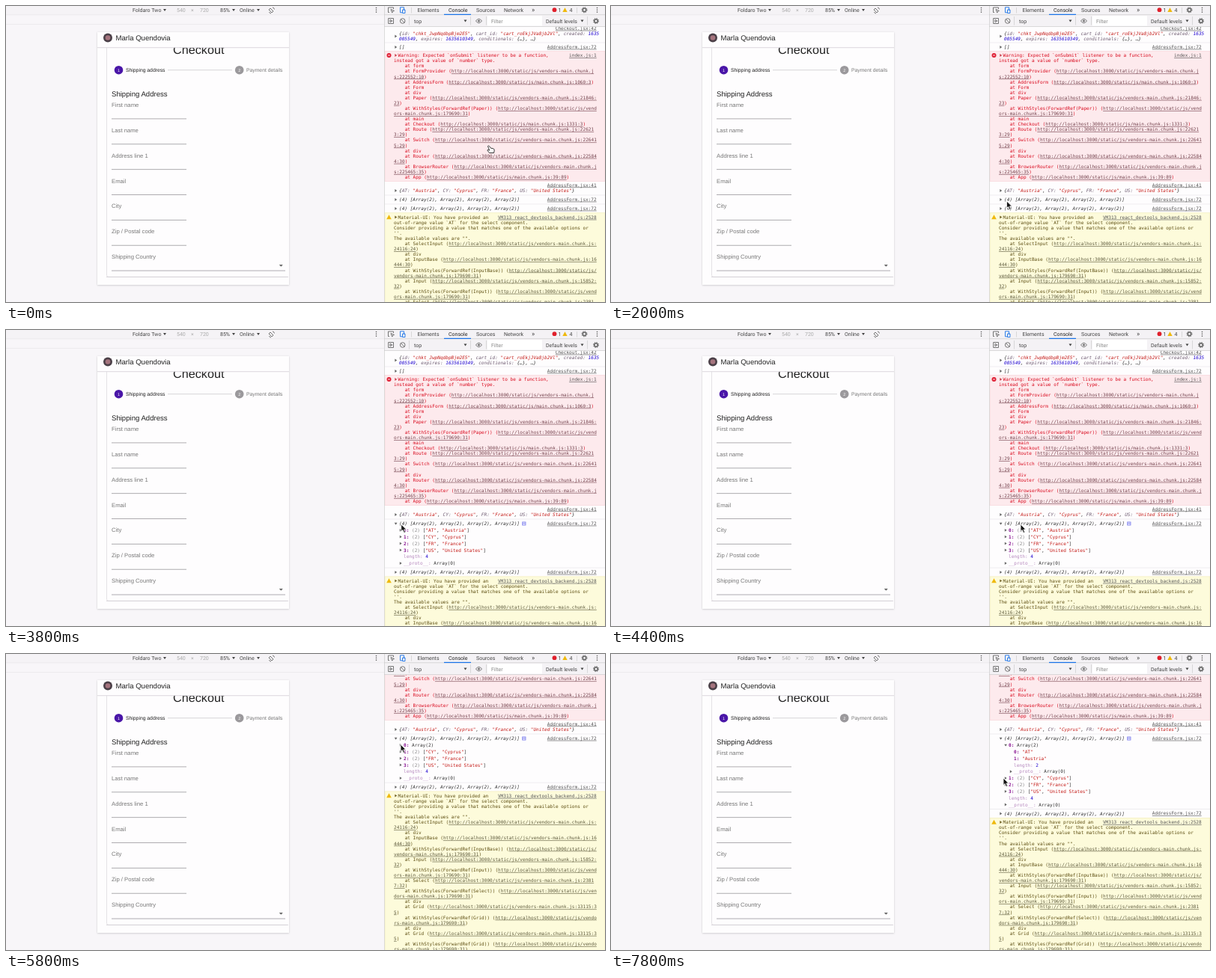
Recreate the animation shown at these times as an HTML page. Size 800 by 396 pixels, loop 8000 ms.

```html
<!DOCTYPE html>
<html lang="en">
<head>
<meta charset="utf-8">
<title>Checkout with console</title>
<style>
  html, body { margin: 0; width: 100%; height: 100%; overflow: hidden; background: #f8f6f9; }
  svg { display: block; width: 100%; height: 100%; }
  text { white-space: pre; text-rendering: geometricPrecision; }
  .ui { font: 7px Roboto, sans-serif; fill: #444; }
  .page { font-family: "Liberation Sans", Arial, sans-serif; fill: #222; }
  .label { font-size: 7.7px; fill: #777; }
  .log { font: 6.08px "DejaVu Sans Mono", monospace; fill: #303030; }
  .italic { font-style: italic; }
  .error { fill: #d90a1e; }
  .warn { fill: #5c4d10; }
  .link { fill: #555; text-decoration: underline; }
  .error .link { fill: #74434e; }
  .warn .link { fill: #5d5a3c; }
  .string { fill: #c41a16; }
  .key { fill: #6d5a70; }
  .index { fill: #881391; font-weight: bold; }
  .faded { fill: #b587bd; }
  .number { fill: #1c00cf; }
  .count { fill: #888; }
  .rule { stroke: #e9e6ea; stroke-width: .7; }
  .sep { stroke: #ccc; stroke-width: .7; }
  .icon { fill: none; stroke: #666; stroke-width: .9; }
</style>
</head>
<body>
<svg viewBox="0 0 800 396" preserveAspectRatio="none">
  <defs>
    <clipPath id="logClip"><rect x="505" y="27.5" width="295" height="369"/></clipPath>
    <clipPath id="pageClip"><rect x="122" y="55.5" width="256" height="318"/></clipPath>
    <filter id="shadow" x="-5%" y="-5%" width="110%" height="110%">
      <feDropShadow dx="0" dy=".6" stdDeviation="1.2" flood-opacity=".2"/>
    </filter>
  </defs>

  <rect width="505" height="396" fill="#f8f6f9"/>
  <rect width="505" height="11.5" fill="#f5f3f6"/>
  <path class="rule" d="M0 11.8H505M0 24.5H505"/>
  <g class="ui">
    <text x="169" y="7.8">Foldaro Two</text>
    <text x="228" y="7.8" fill="#aaa" style="fill:#aaa">540</text>
    <text x="247" y="7.8" style="fill:#aaa">×</text>
    <text x="259" y="7.8" style="fill:#aaa">720</text>
    <text x="286" y="7.8">85%</text>
    <text x="312" y="7.8">Online</text>
    <path d="M210 4h4l-2 3zM302 4h4l-2 3zM335 4h4l-2 3z"/>
  </g>
  <path class="icon" d="M353 3l4 4-2 2-4-4zM356 2q2 0 2.500 2.500M354 10q-2-.2-2.500-2"/>
  <g fill="#555"><circle cx="494.500" cy="2.500" r=".8"/><circle cx="494.500" cy="5.300" r=".8"/><circle cx="494.500" cy="8.100" r=".8"/></g>

  <g class="page" id="page">
    <rect x="122" y="35" width="256" height="338" fill="#fefdfe" filter="url(#shadow)"/>
    <g clip-path="url(#pageClip)">
      <path d="M134.500 55V360q0 2.500 2.500 2.500H375.500" fill="none" stroke="#dedbdf" stroke-width=".8"/>
      <path d="M134 362.500H377" stroke="#d0ccd2" stroke-width=".8"/>
      <text x="223" y="64.300" font-size="16.2">Checkout</text>
    </g>
    <path d="M122 55.700H378" stroke="#dcd8de" stroke-width="1"/>
    <circle cx="136" cy="42.500" r="6" fill="#4b4048"/>
    <circle cx="136" cy="42.500" r="3.300" fill="#a5747e"/>
    <text x="146.500" y="45.800" font-size="9.6">Marla Quendovia</text>
    <path d="M216 85.700H302" stroke="#c8c5ca" stroke-width=".7"/>
    <circle cx="150.500" cy="85.700" r="5.800" fill="#4a16a8"/>
    <circle cx="311.700" cy="85.700" r="5.800" fill="#9b999c"/>
    <g font-size="5.4" text-anchor="middle" style="fill:#fff">
      <text x="150.500" y="87.600">1</text><text x="311.700" y="87.600">2</text>
    </g>
    <text x="160" y="88" font-size="6.8">Shipping address</text>
    <text x="321" y="88" font-size="6.8" style="fill:#777">Payment details</text>
    <text x="141" y="120.600" font-size="9.6">Shipping Address</text>
    <path d="M364.800 346h5l-2.500 2.700z" fill="#666"/>
  </g>

  <rect x="505" width="295" height="396" fill="#fefdfe"/>
  <g clip-path="url(#logClip)">
    <g id="scroll">
      <g id="above"></g>
      <g id="tree"></g>
      <g id="below"></g>
    </g>
  </g>

  <rect x="505" width="295" height="27.5" fill="#f4f2f5"/>
  <rect x="643" y="13" width="73" height="13.500" fill="#fff"/>
  <path class="sep" d="M505.500 0V396M505 11.700H800M505 27.500H800M541.500 2V9.500M762.500 2V9.500M538.500 14V25.500M620.500 14V25.500M641.500 14V25.500M776.500 14V25.500"/>
  <path d="M585 11.300H621" stroke="#1a73e8" stroke-width="1.200"/>
  <g class="ui">
    <text x="549.500" y="7.600">Elements</text>
    <text x="591" y="7.600" style="fill:#222">Console</text>
    <text x="628" y="7.600">Sources</text>
    <text x="665" y="7.600">Network</text>
    <text x="702" y="7.800" font-size="9">»</text>
    <text x="737.500" y="7.600">1</text><text x="752.500" y="7.600">4</text>
    <text x="545" y="22.500">top</text>
    <text x="648" y="22.500" style="fill:#888">Filter</text>
    <text x="721" y="22.500">Default levels</text>
    <path d="M611.500 18.500h4l-2 3zM767.500 18.500h4l-2 3z"/>
  </g>
  <circle cx="732.500" cy="5.200" r="2.900" fill="#e0202c"/>
  <path d="M746.500 2.200l3.200 5.800h-6.400z" fill="#efb90c"/>
  <g class="icon">
    <path d="M512 8.500h-1.500v-6.500h7v2M514 4.500l4.500 2-2 .6-.7 2z"/>
    <path d="M526.500 1.800h5v4M526.500 1.800v7h2.500M529.500 5h3.500v4.500h-3.500z" stroke="#1a73e8"/>
    <path d="M510.700 16.500h6.800v7h-6.800zM513 18.300l3 1.700-3 1.700z"/>
    <circle cx="529.700" cy="20" r="3.300"/><path d="M527.400 17.700l4.600 4.600"/>
    <path d="M627.500 20q4-5.500 8 0q-4 5.500-8 0z"/><circle cx="631.500" cy="20" r="1" fill="#666"/>
    <circle cx="772.500" cy="5.300" r="2.300" stroke-width="1.600"/><circle cx="772.500" cy="5.300" r="3.600" stroke-dasharray="1.400 1.430"/>
    <circle cx="788" cy="20" r="2.300" stroke-width="1.600"/><circle cx="788" cy="20" r="3.600" stroke-dasharray="1.400 1.430"/>
  </g>
  <g fill="#555"><circle cx="789.500" cy="2.500" r=".8"/><circle cx="789.500" cy="5.300" r=".8"/><circle cx="789.500" cy="8.100" r=".8"/></g>

  <g id="cursor">
    <path id="arrow" d="M0 0V9.500L2.200 7.500L3.900 11.400L5.700 10.600L4 6.900H7z" fill="#151515" stroke="#fff" stroke-width=".8"/>
    <path id="hand" d="M-3.500-3.500q1-1.200 2 0L.5-.8L3.500-.3Q5.300.1 5.200 2L4.600 5.500H-1.500L-4 2.200q-.2-1.200 1.300-.7L-1.300 2.200z" fill="#fff" stroke="#222" stroke-width=".9"/>
  </g>
</svg>

<script>
const $ = id => document.getElementById(id);
const NS = "http://www.w3.org/2000/svg";
const LINE = 7.08, ROW = 8.85, COLUMNS = 74;

function add(parent, tag, attrs, content) {
  const node = document.createElementNS(NS, tag);
  for (const name in attrs) node.setAttribute(name, attrs[name]);
  if (content !== undefined) node.textContent = content;
  parent.append(node);
  return node;
}

// Each part is [text, class]; y is the vertical middle of the line.
function write(parent, x, y, parts, cls = "") {
  const text = add(parent, "text", { x, y: y + 2.2, class: "log " + cls });
  for (const [content, part] of parts) add(text, "tspan", { class: part || "" }, content);
  return text;
}

function paint(source) {
  const token = /"[^"]*"|\w+:(?= )|\(\d\)(?= )|(?<=: )\d+|^\d+/g;
  const parts = [];
  let last = 0;
  for (const m of source.matchAll(token)) {
    const s = m[0];
    const cls = s[0] === '"' ? "string"
      : /^\d:$/.test(s) ? "index"
      : /^(length|__proto__):$/.test(s) ? "faded"
      : s.endsWith(":") ? "key"
      : s[0] === "(" ? (m.index ? "count" : "") : "number";
    parts.push([source.slice(last, m.index)], [s, cls]);
    last = m.index + s.length;
  }
  return [...parts, [source.slice(last)]];
}

function triangle(parent, x, y, open, fill = "#666") {
  return add(parent, "path", { fill, d: open
    ? `M${x - 1.8} ${y - 1.2}h3.800l-1.900 2.900z`
    : `M${x - 1.2} ${y - 1.9}v3.800l2.900-1.900z` });
}

function origin(parent, y, name) {
  add(parent, "text", { x: 788.7, y: y + 2.2, class: "log link", "text-anchor": "end" }, name);
}

const rule = (parent, y) => add(parent, "path", { class: "rule", d: `M506 ${y}H800` });

// Long lines break anywhere except before closing punctuation.
function stack(parent, y, calls, cls) {
  for (const call of calls) {
    const [name, place] = call.split(" ");
    let line = "    at " + name;
    if (place) {
      const file = place.includes("/") ? place.slice(1) : "vendors-main.chunk.js:" + place;
      line += ` (http://localhost:3000/static/js/${file})`;
    }
    const from = line.indexOf("http"), to = line.length - 1;
    for (let start = 0; start < line.length;) {
      let end = Math.min(start + COLUMNS, line.length);
      while (end < line.length && /[:\/.)]/.test(line[end])) end--;
      const cut = i => Math.min(Math.max(i, start), end);
      const parts = from < 0 ? [[line.slice(start, end)]] : [
        [line.slice(start, cut(from))],
        [line.slice(cut(from), cut(to)), "link"],
        [line.slice(cut(to), end)]];
      write(parent, 518, y, parts, cls);
      y += LINE;
      start = end;
    }
  }
}

const labels = ["First name", "Last name", "Address line 1", "Email", "City", "Zip / Postal code", "Shipping Country"];
labels.forEach((label, i) => {
  const y = 132.2 + i * 33.87;
  add($("page"), "text", { x: 141, y: y + 2.8, class: "label" }, label);
  add($("page"), "path", { d: `M141 ${y + 18.700}H${i < 6 ? 241 : 373}`, stroke: "#9a979c", "stroke-width": .8 });
});

const above = $("above"), tree = $("tree"), below = $("below");

origin(above, 29.5, "Checkout.jsx:42");
triangle(above, 520.5, 40.5);
write(above, 525, 37, paint('{id: "chkt_JwpNqdbpBjm2E5", cart_id: "cart_roEkjJVa8jb2Vl", created: 1635'), "italic");
write(above, 525, 44, paint("005549, expires: 1635610349, conditionals: {…}, …}"), "italic");
rule(above, 49);
triangle(above, 520.5, 55);
write(above, 525, 55, [["[]"]], "italic");
origin(above, 54.5, "AddressForm.jsx:72");

add(above, "rect", { x: 506, y: 60.5, width: 294, height: 174, fill: "#fdeaed", stroke: "#f8d6da", "stroke-width": .7 });
add(above, "circle", { cx: 511.5, cy: 66, r: 3, fill: "#df1f35" });
add(above, "path", { d: "M510.400 64.900l2.200 2.200m0-2.200l-2.200 2.200", stroke: "#fff", "stroke-width": .7 });
triangle(above, 520.5, 66, false, "#c8404e");
write(above, 523.5, 66, [["Warning: Expected `onSubmit` listener to be a function,"]], "error");
write(above, 518, 66 + LINE, [["instead got a value of `number` type."]], "error");
origin(above, 66, "index.js:1");
stack(above, 66 + 2 * LINE, [
  "form", "FormProvider 222552:10", "AddressForm /main.chunk.js:1060:3", "Form", "div",
  "Paper 21846:23", "WithStyles(ForwardRef(Paper)) 179690:31", "main", "Checkout /main.chunk.js:1331:3",
  "Route 226213:29", "Switch 226415:29", "div", "Router 225844:30", "BrowserRouter 225465:35",
  "App /main.chunk.js:39:89"
], "error");

origin(above, 239.3, "AddressForm.jsx:41");
triangle(above, 520.5, 247);
write(above, 525, 247, paint('{AT: "Austria", CY: "Cyprus", FR: "France", US: "United States"}'), "italic");
rule(above, 253);
const selection = add(above, "rect", { x: 525, y: 255.3, width: 161, height: 7.6, fill: "#b5b9e2" });
const summary = "(4) [Array(2), Array(2), Array(2), Array(2)]";
const closedMark = triangle(above, 520.5, 259), openMark = triangle(above, 520.5, 259, true);
write(above, 525, 259, paint(summary), "italic");
origin(above, 258.5, "AddressForm.jsx:72");

const info = add(tree, "g", {});
add(info, "rect", { x: 689, y: 256.2, width: 5.6, height: 5.6, rx: 1, fill: "#a9aaf3" });
add(info, "path", { d: "M691.800 257.200v.9m0 .7v2.200", stroke: "#fff", "stroke-width": .9 });

function property(parent, x, y, source, expandable = true) {
  if (expandable) triangle(parent, x - 4, y);
  return write(parent, x, y, paint(source));
}
const firstY = 259 + ROW;
const first = add(tree, "g", {}), firstPending = add(tree, "g", {}), nested = add(tree, "g", {}), rest = add(tree, "g", {});
property(first, 531, firstY, '0: (2) ["AT", "Austria"]');
property(firstPending, 531, firstY, "0: Array(2)");
triangle(nested, 527, firstY, true);
property(nested, 531, firstY, "0: Array(2)", false);
['0: "AT"', '1: "Austria"', "length: 2", "__proto__: Array(0)"].forEach((source, i) =>
  property(nested, 538, firstY + (i + 1) * ROW, source, i === 3));
['1: (2) ["CY", "Cyprus"]', '2: (2) ["FR", "France"]', '3: (2) ["US", "United States"]', "length: 4", "__proto__: Array(0)"]
  .forEach((source, i) => property(rest, 531, firstY + (i + 1) * ROW, source, i !== 3));

rule(below, 265);
triangle(below, 520.5, 271);
write(below, 525, 271, paint(summary), "italic");
origin(below, 270.5, "AddressForm.jsx:72");
add(below, "rect", { x: 506, y: 276.8, width: 294, height: 360, fill: "#fdfbdb", stroke: "#f3eebb", "stroke-width": .7 });
add(below, "path", { d: "M511.500 279.200l3.300 6h-6.600z", fill: "#efb90c" });
triangle(below, 520.5, 282.5, false, "#6d5d20");
write(below, 523.5, 282.5, [["Material-UI: You have provided an"]], "warn");
origin(below, 282.5, "VM313 react_devtools_backend.js:2528");
["out-of-range value `AT` for the select component.",
 "Consider providing a value that matches one of the available options or",
 "''.", 'The available values are "".'].forEach((line, i) =>
  write(below, 518, 282.5 + (i + 1) * LINE, [[line]], "warn"));
stack(below, 282.5 + 5 * LINE, [
  "SelectInput 24116:24", "div", "InputBase 16444:30", "WithStyles(ForwardRef(InputBase)) 179690:31",
  "Input 15852:32", "WithStyles(ForwardRef(Input)) 179690:31", "Select 23817:32",
  "WithStyles(ForwardRef(Select)) 179690:31", "div", "Grid 13115:35", "WithStyles(ForwardRef(Grid)) 179690:31",
  "div", "Grid 13115:35", "WithStyles(ForwardRef(Grid)) 179690:31"
], "warn");

const LOOP = 8000, STEP = 200;
// time, x, y
const path = [
  [0, 647, 191], [200, 640, 196], [1000, 540, 263], [1600, 536, 262], [2400, 521, 260], [3600, 521, 260],
  [4200, 547, 260], [4800, 547, 260], [5400, 527, 121], [6000, 527, 121], [6600, 558, 131],
  [7000, 558, 133], [7600, 524, 166], [8000, 524, 166]
];

function cursorAt(t) {
  const i = path.findIndex(p => p[0] > t);
  const [t0, x0, y0] = path[i - 1], [t1, x1, y1] = path[i];
  const k = (t - t0) / (t1 - t0), e = k * k * (3 - 2 * k);
  return [x0 + (x1 - x0) * e, y0 + (y1 - y0) * e];
}

const show = (node, on) => node.style.display = on ? "" : "none";
const shift = (node, y) => node.setAttribute("transform", `translate(0 ${y})`);

function draw(now) {
  const t = Math.floor(now % LOOP / STEP) * STEP;
  const open = t >= 3400, pending = t >= 5800 && t < 6000, deep = t >= 6000;
  const nestedHeight = deep ? 4 * ROW : 0;
  show(selection, t >= 2600 && !open);
  show(closedMark, !open);
  show(openMark, open);
  show(tree, open);
  show(first, !pending && !deep);
  show(firstPending, pending);
  show(nested, deep);
  shift(rest, nestedHeight);
  shift(below, open ? 6 * ROW + nestedHeight : 0);
  shift($("scroll"), t >= 4800 ? -146 : 0);
  const [x, y] = cursorAt(t), pointing = t < 600;
  $("cursor").setAttribute("transform", `translate(${x} ${y})`);
  show($("hand"), pointing);
  show($("arrow"), !pointing);
}

const started = performance.now();
function tick() {
  draw(performance.now() - started);
  requestAnimationFrame(tick);
}
tick();
</script>
</body>
</html>
```
